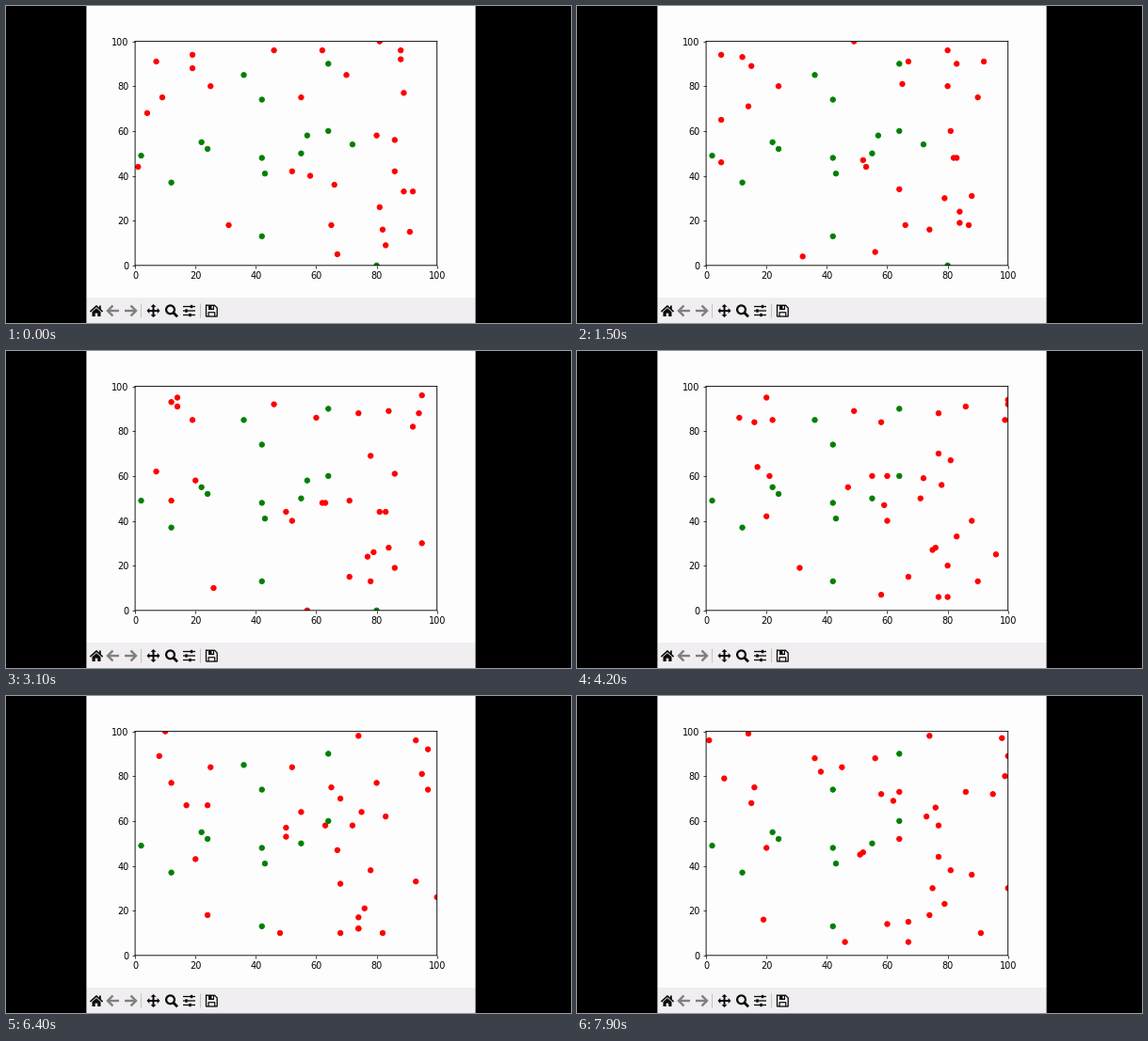
Write a matplotlib script that moves like this. It is 600x337 px and loops after 8 s.

```python
import numpy as np
import matplotlib.pyplot as plt
from matplotlib.animation import FuncAnimation
from matplotlib.patches import Circle, Polygon, Rectangle

W, H, DPI = 600, 337, 100
FRAMES, STEP_MS = 80, 100
PX = 72 / DPI          # one pixel in points
K = 0.646              # scale of the plot window
PAPER, BAR, INK, DIM = "#fefdfe", "#f0eef0", "#0a0a0a", "#808080"

rng = np.random.default_rng(7)

# ---------- population ----------
hunters = [(1, 44), (4, 68), (7, 91), (9, 75), (19, 94), (19, 88), (25, 80),
           (31, 18), (46, 96), (62, 96), (55, 75), (70, 85), (81, 100),
           (88, 96), (88, 92), (89, 77), (80, 58), (86, 56), (86, 42),
           (89, 33), (92, 33), (81, 26), (82, 16), (83, 9), (91, 15),
           (65, 18), (67, 5), (66, 36), (52, 42), (58, 40)]
safe = [(2, 49), (12, 37), (22, 55), (24, 52), (42, 74), (42, 48),
        (43, 41), (42, 13), (55, 50), (64, 60), (64, 90)]
eaten = {(72, 54): 22, (80, 0): 35, (57, 58): 37, (36, 85): 73}


def wander(start, born=0):
    """Random walk in whole steps of -2..2 that stays on the board."""
    path = np.full((FRAMES, 2), np.nan)
    path[born] = start
    for i in range(born + 1, FRAMES):
        path[i] = np.clip(path[i - 1] + rng.integers(-2, 3, 2), 0, 100)
    return path


def rest(spot, end=FRAMES):
    path = np.full((FRAMES, 2), np.nan)
    path[:end] = spot
    return path


# every green dot that is eaten leaves two new red ones
reds = [wander(p) for p in hunters]
reds += [wander(p, t) for p, t in eaten.items() for _ in range(2)]
greens = [rest(p) for p in safe] + [rest(p, t) for p, t in eaten.items()]
paths = np.array(reds + greens)
colors = np.array(["red"] * len(reds) + ["green"] * len(greens))

# ---------- window ----------
fig = plt.figure(figsize=(W / DPI, H / DPI), dpi=DPI, facecolor="black")
win = fig.add_axes([0, 0, 1, 1], xlim=(0, W), ylim=(H, 0))
win.axis("off")


def box(x, y, w, h, color):
    win.add_patch(Rectangle((x, y), w, h, fc=color, lw=0, snap=False))


def poly(*pts, color=INK):
    win.add_patch(Polygon(pts, fc=color, lw=0))


def line(*pts, color=INK, w=2.0):
    x, y = zip(*pts)
    win.plot(x, y, color=color, lw=w * PX, snap=False,
             solid_capstyle="butt", solid_joinstyle="miter")


def arrow(cx, side):
    tip = cx + side * 6
    line((cx - side * 6, 324), (tip - side, 324), color=DIM, w=2.4)
    line((tip - side * 5.5, 318.5), (tip, 324), (tip - side * 5.5, 329.5),
         color=DIM, w=2.4)


box(85.4, 0, 413.2, 310, PAPER)
box(85.4, 310, 413.2, 27, BAR)

# home
line((89.4, 325), (96, 319), (102.6, 325), w=1.6)
box(99, 318.5, 1.8, 4, INK)
poly((91.5, 325.2), (96, 321.2), (100.5, 325.2), (100.5, 330), (97.3, 330),
     (97.3, 326.6), (94.7, 326.6), (94.7, 330), (91.5, 330))
arrow(114, -1)
arrow(132, 1)
# pan
line((151, 324), (162, 324))
line((156.5, 318.5), (156.5, 329.5))
for dx, dy in ((1, 0), (-1, 0), (0, 1), (0, -1)):
    bx, by = 156.5 + 4.2 * dx, 324 + 4.2 * dy
    poly((156.5 + 7 * dx, 324 + 7 * dy), (bx + 3 * dy, by + 3 * dx),
         (bx - 3 * dy, by - 3 * dx))
# zoom
win.add_patch(Circle((174.5, 322.8), 4.4, fc="none", ec=INK, lw=2.2 * PX))
line((177.5, 325.8), (182, 330.3), w=2.8)
# sliders
for y, knob in ((319.5, 197), (324, 191.5), (328.5, 195.5)):
    line((188, y), (201, y), w=1.3)
    box(knob - 1.2, y - 1.7, 2.4, 3.4, INK)
# save
line((212.5, 318.2), (221.5, 318.2), (224.2, 321), (224.2, 330),
     (212.5, 330), (212.5, 317.6), w=1.3)
poly((214.5, 318), (221, 318), (221, 322.6), (214.5, 322.6))
box(218.4, 319, 1.5, 2.6, BAR)
line((215, 330), (215, 325.7), (221.7, 325.7), (221.7, 330), w=1.2)
for x in (143.5, 206.5):
    line((x, 316.5), (x, 331.5), color="#c4c3c4", w=1)

# ---------- plot ----------
left, right, top, base = 137.1, 457.7, 37.6, 275.8
ax = fig.add_axes([left / W, 1 - base / H, (right - left) / W,
                   (base - top) / H], xlim=(0, 100), ylim=(0, 100),
                  facecolor=PAPER)
ax.tick_params(labelsize=7, length=3.5 * K, width=0.8 * K, pad=3.5 * K)
for spine in ax.spines.values():
    spine.set(linewidth=K, snap=False)

dots = ax.scatter([], [], s=(6 * K) ** 2, linewidths=K, snap=False)


def update(i):
    now = paths[:, i]
    alive = ~np.isnan(now[:, 0])
    dots.set_offsets(now[alive])
    dots.set_color(colors[alive])
    return dots,


anim = FuncAnimation(fig, update, frames=FRAMES, interval=STEP_MS,
                     repeat=True, repeat_delay=0)
plt.show()
```
